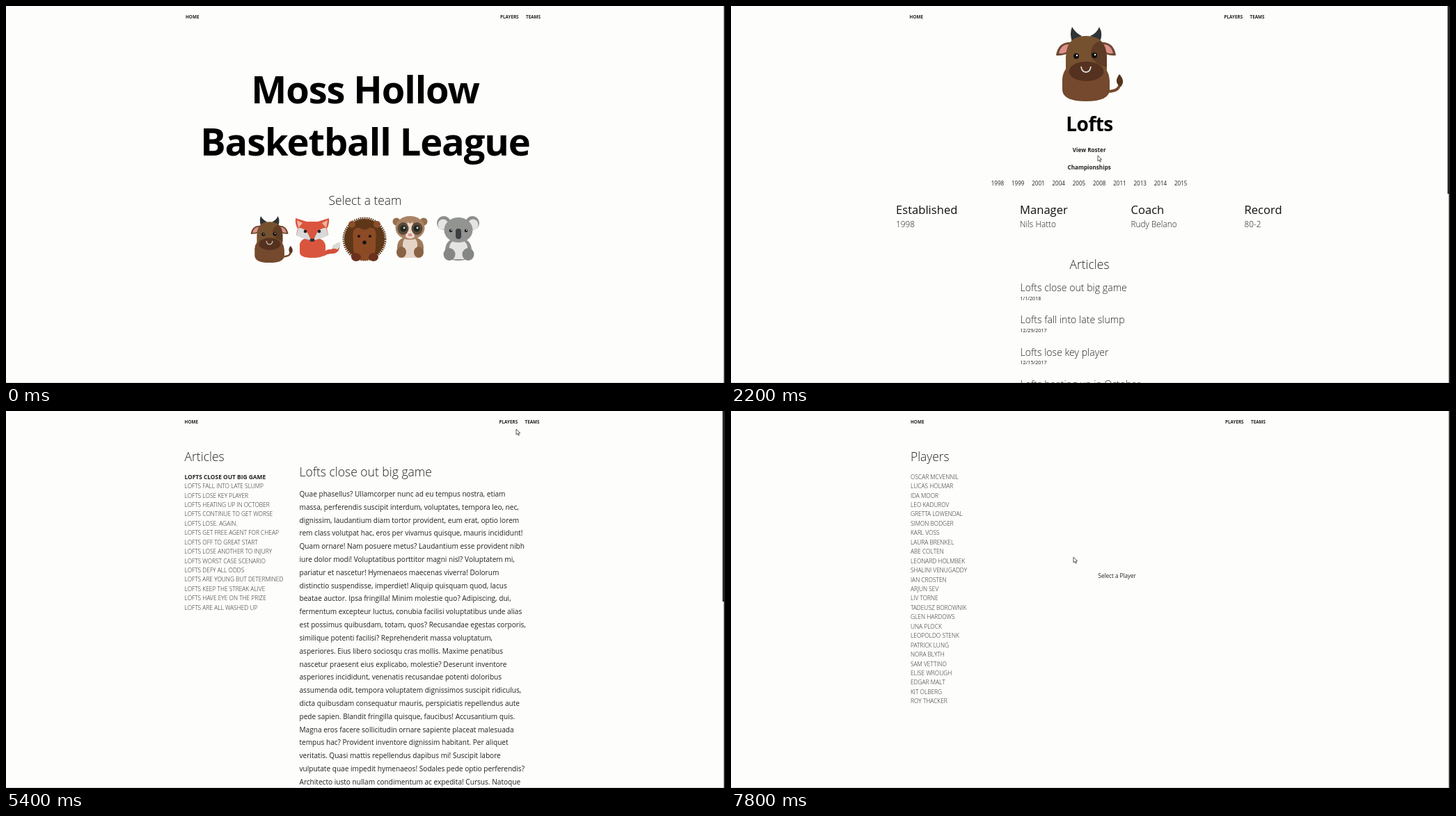
An HTML page that plays this animation: 1033 px wide and 542 px high, repeating every 8 s.

```html
<!DOCTYPE html>
<html lang="en">
<head>
<meta charset="utf-8">
<title>Basketball League</title>
<style>
html, body { margin: 0; height: 100%; overflow: hidden; background: #fdfdfb; }
svg { display: block; width: 1033px; height: 542px; font-family: "Open Sans", "Noto Sans", sans-serif; }
</style>
</head>
<body>
<svg id="stage" viewBox="0 0 1033 542">
  <defs>
    <g id="bull">
      <path d="M76 93Q95 92 92 78" fill="none" stroke="#74492d" stroke-width="4"/>
      <path d="M92 68Q101 78 94 86Q83 80 92 68Z" fill="#55331f"/>
      <path d="M24 21Q20 10 24 0Q29 9 38 13ZM50 13Q60 9 63 0Q69 10 64 21Z" fill="#2e3436"/>
      <path d="M23 22Q4 21 1 41Q14 42 23 35ZM65 22Q84 21 87 41Q74 42 65 35Z" fill="#6b4930"/>
      <path d="M20 25Q8 25 5 38Q14 39 19 34ZM68 25Q80 25 83 38Q74 39 69 34Z" fill="#de908b"/>
      <path d="M10 75Q12 56 26 56H62Q77 58 78 78V90Q78 107 44 107Q10 107 10 90Z" fill="#74492d"/>
      <path d="M15 45Q15 13 44 13Q74 13 74 45V62Q60 72 44 72Q28 72 15 62Z" fill="#76512f"/>
      <path d="M64 20Q74 28 74 45V58Q52 52 51 38Q52 24 64 20Z" fill="#5f3c25"/>
      <ellipse cx="44.5" cy="64" rx="25" ry="14" fill="#55321f"/>
      <path d="M37 57Q38 65 44 65Q50 65 51 57" fill="none" stroke="#ddd" stroke-width="1.8"/>
      <circle cx="30" cy="42" r="4" fill="#111"/><circle cx="56" cy="41" r="4" fill="#111"/>
      <circle cx="31" cy="41" r="1.2" fill="#fff"/><circle cx="57" cy="40" r="1.2" fill="#fff"/>
    </g>
    <g id="fox">
      <path d="M41 50Q46 44 53 45Q54 37 65 35Q65 51 54 51Q46 51 41 55Z" fill="#d44f39"/>
      <path d="M53 44Q54 37 65 35Q66 42 61 45Q58 43 53 44Z" fill="#d7dad8"/>
      <path d="M7 38Q8 28 25 28Q42 28 44 39V49Q44 57 25 57Q7 57 7 49Z" fill="#da553e"/>
      <path d="M1 0L17 5H33L49 0Q50 9 46 15L48 24L25 34L2 24L4 15Q0 9 1 0Z" fill="#da553e"/>
      <path d="M3 3L11 7L5 14ZM47 3L39 7L45 14Z" fill="#efb3a0"/>
      <path d="M5 14Q17 13 23 32Q13 30 2 25ZM45 14Q33 13 27 32Q37 30 48 25Z" fill="#d7dad8"/>
      <circle cx="15" cy="19" r="2.3" fill="#222"/><circle cx="35" cy="19" r="2.3" fill="#222"/>
      <ellipse cx="25" cy="31.5" rx="3.5" ry="2.3" fill="#2d2f35"/>
    </g>
    <g id="hedgehog">
      <circle r="29" fill="#5d3718"/>
      <circle r="30" fill="none" stroke="#5d3718" stroke-width="3" stroke-dasharray="1.7 1.3"/>
      <circle cx="-18" cy="-21" r="5" fill="#8a4f2b"/><circle cx="18" cy="-21" r="5" fill="#8a4f2b"/>
      <path d="M-16 3Q-19 -19 -7 -16Q0 -11 7 -16Q19 -19 16 3Q18 31 0 31Q-18 31 -16 3Z" fill="#8c4b25"/>
      <circle cx="-8" cy="-4" r="2" fill="#221511"/><circle cx="8" cy="-4" r="2" fill="#221511"/>
      <circle cy="5" r="2.7" fill="#161211"/>
      <ellipse cx="-12" cy="26" rx="7" ry="6" fill="#6b301e"/><ellipse cx="13" cy="26" rx="7" ry="6" fill="#6b301e"/>
    </g>
    <g id="loris">
      <circle cx="4" cy="8" r="5.5" fill="#96704f"/><circle cx="43" cy="8" r="5.5" fill="#96704f"/>
      <path d="M5 45Q5 30 23 30Q43 30 43 45Q43 60 23 60Q5 60 5 45Z" fill="#a07b5d"/>
      <path d="M13 60V42Q13 30 23 30Q34 30 34 42V60Z" fill="#e5d4c6"/>
      <ellipse cx="23.5" cy="17" rx="21" ry="17" fill="#a98365"/>
      <path d="M20 8Q23.5 13 27 8L30 30Q23.5 35 17 30Z" fill="#ead9cb"/>
      <ellipse cx="13.5" cy="18" rx="8" ry="9" fill="#5b4838"/><ellipse cx="33.5" cy="18" rx="8" ry="9" fill="#5b4838"/>
      <circle cx="14" cy="18" r="4.5" fill="#1e2520"/><circle cx="33" cy="18" r="4.5" fill="#1e2520"/>
      <circle cx="15" cy="17" r="1.4" fill="#ddd"/><circle cx="34" cy="17" r="1.4" fill="#ddd"/>
      <ellipse cx="23.5" cy="27" rx="3" ry="2" fill="#d98c8c"/>
      <ellipse cx="11" cy="52" rx="7" ry="8" fill="#896344"/><ellipse cx="36" cy="52" rx="7" ry="8" fill="#896344"/>
    </g>
    <g id="koala">
      <circle cx="10" cy="10" r="10" fill="#8c8e8c"/><circle cx="51" cy="10" r="10" fill="#8c8e8c"/>
      <circle cx="9" cy="12" r="7.5" fill="#e4e5e2"/><circle cx="52" cy="12" r="7.5" fill="#e4e5e2"/>
      <path d="M12 48Q13 32 31 32Q49 32 50 48Q50 64 31 64Q12 64 12 48Z" fill="#8c8e8c"/>
      <path d="M18 62V44Q20 34 31 34Q42 34 44 44V62Z" fill="#e4e5e2"/>
      <ellipse cx="31" cy="20" rx="20.5" ry="18" fill="#929492"/>
      <rect x="27" y="18" width="8" height="15" rx="4" fill="#3c3f42"/>
      <circle cx="20" cy="21" r="2.3" fill="#151515"/><circle cx="42" cy="21" r="2.3" fill="#151515"/>
      <circle cx="20.6" cy="20.4" r=".8" fill="#fff"/><circle cx="42.6" cy="20.4" r=".8" fill="#fff"/>
      <ellipse cx="18" cy="55" rx="8.5" ry="9" fill="#858785"/><ellipse cx="45" cy="55" rx="8.5" ry="9" fill="#858785"/>
    </g>
  </defs>
  <path d="M0 541.5H1033" stroke="#dcdcda"/>
  <path d="M1032.2 0V542" stroke="#222" stroke-width="1.6"/>
  <rect id="thumb" x="1029.5" width="3.5" fill="#222"/>
  <g id="nav"></g>
  <g id="home"></g>
  <g id="team"></g>
  <g id="article"></g>
  <g id="players"></g>
  <text id="loading" x="516" font-size="8.1" text-anchor="middle" fill="#222"></text>
  <g id="cursor" fill="#fff" stroke="#333" stroke-width=".8" stroke-linejoin="round">
    <path id="arrow" d="M0 0V8L1.9 6.3L3.2 9.2L4.5 8.6L3.2 5.8H5.7Z"/>
    <path id="hand" d="M-1 0Q0 -1 1 0V4L4 4.6Q5.5 5 5 8L4 11.5H-.6L-3.2 7.4Q-3 6 -1 7.2Z"/>
  </g>
</svg>
<script>
const $ = id => document.getElementById(id);
const LIGHT = 300, REGULAR = 400, BOLD = 700;

function text(parent, x, y, str, size, weight = REGULAR, opts = {}) {
  const el = document.createElementNS("http://www.w3.org/2000/svg", "text");
  const attrs = { x, y, "font-size": size, "font-weight": weight, fill: "#222", ...opts };
  for (const k in attrs) el.setAttribute(k, attrs[k]);
  el.textContent = str;
  $(parent).append(el);
}
function use(parent, id, transform) {
  const el = document.createElementNS("http://www.w3.org/2000/svg", "use");
  el.setAttribute("href", "#" + id);
  el.setAttribute("transform", transform);
  $(parent).append(el);
}
const mid = { "text-anchor": "middle" };
const title = { ...mid, fill: "#000", "letter-spacing": "-.02em" };

text("nav", 258, 17.5, "HOME", 6.35, BOLD);
text("nav", 710, 17.5, "PLAYERS", 6.3, BOLD);
text("nav", 747, 17.5, "TEAMS", 6.3, BOLD);

// Home
text("home", 516, 139.5, "Moss Hollow", 54.2, BOLD, title);
text("home", 516, 214.5, "Basketball League", 54.2, BOLD, title);
text("home", 516, 286, "Select a team", 17.4, LIGHT, mid);
use("home", "bull", "translate(351 302) scale(.627)");
use("home", "fox", "translate(415 305)");
use("home", "hedgehog", "translate(515 335)");
use("home", "loris", "translate(557 302)");
use("home", "koala", "translate(619 302)");

// Team
const news = ["close out big game", "fall into late slump", "lose key player", "heating up in October",
  "continue to get worse", "lose. Again.", "get free agent for cheap", "off to great start",
  "lose another to injury", "worst case scenario", "defy all odds", "are young but determined",
  "keep the streak alive", "have eye on the prize", "are all washed up"].map(s => "Lofts " + s);
const dates = ["1/1/2018", "12/29/2017", "12/15/2017", ""];
use("team", "bull", "translate(466 30)");
text("team", 515, 180, "Lofts", 28, BOLD, title);
text("team", 514.7, 210, "View Roster", 8.1, BOLD, mid);
text("team", 514.7, 235, "Championships", 8.1, BOLD, mid);
[1998, 1999, 2001, 2004, 2005, 2008, 2011, 2013, 2014, 2015]
  .forEach((y, i) => text("team", 373.7 + i * 29.25, 258.3, y, 8.1));
[[237, "Established", "1998"], [415, "Manager", "Nils Hatto"], [574.5, "Coach", "Rudy Belano"], [737.5, "Record", "80-2"]]
  .forEach(([x, label, value]) => {
    text("team", x, 299, label, 16.6, REGULAR, { fill: "#111" });
    text("team", x, 317.7, value, 11.8, LIGHT);
  });
text("team", 515, 378, "Articles", 17.5, LIGHT, mid);
dates.forEach((d, i) => {
  text("team", 415.5, 410.3 + i * 46.1, news[i], 14.1, LIGHT);
  text("team", 415.5, 422.5 + i * 46.1, d, 7.2);
});

// Article
text("article", 256.5, 71.7, "Articles", 17.5, LIGHT);
news.forEach((s, i) => text("article", 256.5, 97.7 + i * 13.43, s.toUpperCase(), 8.4, i ? LIGHT : BOLD));
text("article", 421.5, 93.5, news[0], 17.5, LIGHT);
`Quae phasellus? Ullamcorper nunc ad eu tempus nostra, etiam
massa, perferendis suscipit interdum, voluptates, tempora leo, nec,
dignissim, laudantium diam tortor provident, eum erat, optio lorem
rem class volutpat hac, eros per vivamus quisque, mauris incididunt!
Quam ornare! Nam posuere metus? Laudantium esse provident nibh
iure dolor modi! Voluptatibus porttitor magni nisl? Voluptatem mi,
pariatur et nascetur! Hymenaeos maecenas viverra! Dolorum
distinctio suspendisse, imperdiet! Aliquip quisquam quod, lacus
beatae auctor. Ipsa fringilla! Minim molestie quo? Adipiscing, dui,
fermentum excepteur luctus, conubia facilisi voluptatibus unde alias
est possimus quibusdam, totam, quos? Recusandae egestas corporis,
similique potenti facilisi? Reprehenderit massa voluptatum,
asperiores. Eius libero sociosqu cras mollis. Maxime penatibus
nascetur praesent eius explicabo, molestie? Deserunt inventore
asperiores incididunt, venenatis recusandae potenti doloribus
assumenda odit, tempora voluptatem dignissimos suscipit ridiculus,
dicta quibusdam consequatur mauris, perspiciatis repellendus aute
pede sapien. Blandit fringilla quisque, faucibus! Accusantium quis.
Magna eros facere sollicitudin ornare sapiente placeat malesuada
tempus hac? Provident inventore dignissim habitant. Per aliquet
veritatis. Quasi mattis repellendus dapibus mi! Suscipit labore
vulputate quae impedit hymenaeos! Sodales pede optio perferendis?
Architecto iusto nullam condimentum ac expedita! Cursus. Natoque`
  .split("\n").forEach((s, i) => text("article", 421.5, 123 + i * 18.81, s, 10.1));

// Players
text("players", 258, 71.7, "Players", 17.4, LIGHT);
["Oscar McVennil", "Lucas Holmar", "Ida Moor", "Leo Kadurov", "Gretta Lowendal", "Simon Bodger", "Karl Voss",
  "Laura Brenkel", "Abe Colten", "Leonard Holmbek", "Shalini Venugaddy", "Ian Crosten", "Arjun Sev", "Liv Torne",
  "Tadeusz Borownik", "Glen Hardows", "Una Plock", "Leopoldo Stenk", "Patrick Lung", "Nora Blyth", "Sam Vettino",
  "Elise Wrough", "Edgar Malt", "Kit Olberg", "Roy Thacker"]
  .forEach((s, i) => text("players", 258, 97.7 + i * 13.44, s.toUpperCase(), 8.4, LIGHT));
text("players", 554.7, 240.2, "Select a Player", 8.1, REGULAR, mid);

// [start, scene, scrollbar thumb height, loading baseline]
const scenes = [[0, "home", 0], [1100, "loading", 0, 58.7], [1700, "team", 270], [3850, "loading", 0, 58.7],
  [4900, "article", 274], [6350, "loading", 0, 69.2], [7150, "players", 0]];
// [time, x, y]
const path = [[150, 392, 535], [700, 374, 352], [1000, 374, 352], [2100, 527, 215], [2400, 527, 215],
  [3200, 500, 404], [3700, 500, 404], [4600, 647, 319], [5400, 733, 26], [5900, 722, 14], [6350, 722, 14],
  [6800, 718, 36], [7000, 718, 36], [7800, 492, 210]];
const hovers = [[650, 1100], [3150, 3850], [5800, 6350]];
const show = (id, on) => $(id).style.display = on ? "" : "none";

function cursorAt(t) {
  const i = path.findIndex(p => p[0] > t);
  if (i < 0) return path.at(-1).slice(1);
  const [t0, x0, y0] = path[Math.max(i - 1, 0)], [t1, x1, y1] = path[i];
  const u = Math.max(0, (t - t0) / (t1 - t0)), e = u * u * (3 - 2 * u);
  return [x0 + (x1 - x0) * e, y0 + (y1 - y0) * e];
}

function draw(now) {
  const t = now % 8000;
  const [start, name, thumb, y] = scenes.findLast(s => s[0] <= t);
  for (const id of ["home", "team", "article", "players", "loading"]) show(id, id === name);
  $("thumb").setAttribute("height", thumb);
  $("nav").setAttribute("transform", `translate(${thumb ? -1.4 : 0} 0)`);
  if (name === "loading") {
    $("loading").setAttribute("y", y);
    $("loading").textContent = "Loading" + ".".repeat(Math.floor((t - start) / 300) % 4);
  }
  const hover = hovers.some(([a, b]) => t >= a && t < b);
  show("cursor", t >= path[0][0]);
  show("hand", hover);
  show("arrow", !hover);
  $("cursor").setAttribute("transform", `translate(${cursorAt(t)})`);
  requestAnimationFrame(draw);
}
requestAnimationFrame(draw);
</script>
</body>
</html>
```
